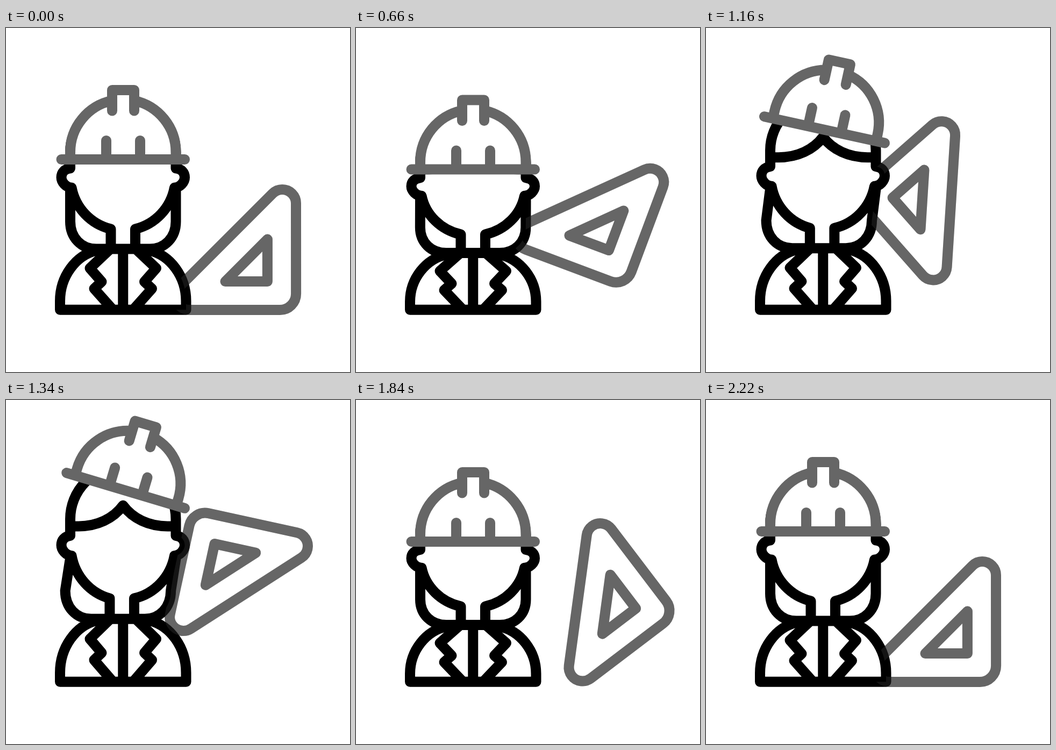
These frames come from a looping animation (640 by 640 pixels, 2.4 s). An HTML page with a canvas:

```html
<!DOCTYPE html>
<html lang="en">
<head>
<meta charset="utf-8">
<title>Engineer</title>
<style>
  html, body { margin: 0; width: 100%; height: 100%; overflow: hidden; background: #fff; }
  canvas { display: block; width: 640px; height: 640px; }
</style>
</head>
<body>
<canvas id="stage" width="640" height="640"></canvas>
<script>
const ctx = document.getElementById('stage').getContext('2d');
const LOOP = 2400, GREY = '#666', BASE = 524.3, AXIS = 217.75;

// Smooth curve through [time, value] keys, flat at every turning point.
function curve(...keys) {
  const rise = i => (keys[i + 1][1] - keys[i][1]) / (keys[i + 1][0] - keys[i][0]);
  const slopes = keys.map((_, i) => {
    if (i === 0 || i === keys.length - 1) return 0;
    const a = rise(i - 1), b = rise(i);
    return a * b > 0 ? 2 * a * b / (a + b) : 0;
  });
  return t => {
    if (t <= keys[0][0]) return keys[0][1];
    const i = keys.findIndex(k => k[0] >= t) - 1;
    if (i < 0) return keys[keys.length - 1][1];
    const [t0, v0] = keys[i], [t1, v1] = keys[i + 1];
    const d = t1 - t0, u = (t - t0) / d, w = 1 - u;
    return v0 * w * w * (1 + 2 * u) + v1 * u * u * (3 - 2 * u)
      + d * u * w * (slopes[i] * w - slopes[i + 1] * u);
  };
}

// Crouch, jump, land and rise again.
const stretch = curve([200, 0], [600, -.069], [1400, .034], [1800, -.069], [2200, 0]);
const sway = curve([600, 0], [1400, -9.5], [1600, 0]);
const hatY = curve([200, 0], [600, 19.5], [1400, -44], [1540, -44], [1800, 19.5], [2200, 0]);
const hatTilt = curve([700, 0], [1400, 17], [1500, 17], [1800, 0]);
const rulerX = curve([300, 0], [680, 10], [1800, 9], [2200, 0]);
const rulerY = curve([300, 0], [660, -75.5], [980, -99], [1340, -66.5], [1840, -34], [2200, 0]);
const rulerTurn = curve([400, 0], [2200, 360]);

// Set square around its own pivot: rounded outer triangle and inner cut-out.
const ruler = new Path2D();
ruler.arc(89, -82.6, 25.5, -Math.PI * .75, 0);
ruler.arc(84.6, 86, 30, 0, Math.PI / 2);
ruler.arc(-84, 90.4, 25.5, Math.PI / 2, Math.PI * 1.25);
ruler.closePath();
ruler.addPath(new Path2D('M61.4 -15.5V63H-17Z'));

const hatFill = new Path2D('M119.5 244.5V231A98 98 0 0 1 316 231V244.5ZM197.5 140V115.5H238.5V140Z');
const hatLines = new Path2D('M103 244.5H332.5M119.5 244V231A98 98 0 0 1 197.5 135'
  + 'M316 244V231A98 98 0 0 0 238.5 135M197.5 154V115.5H238.5V154M186.5 209.5V244M249.5 209.5V244');

// Left half of the figure; h shifts the loose hair sideways.
function half(h) {
  const dome = `M${AXIS} 136A98 95 0 0 0 119.5 231V261`;
  const ear = 'C109 262 103 269 103 278S112 297 122 297';
  const hair = `L${119.5 + h} 360C${119.5 + h} 390 ${140 + h} 411 ${168 + h} 411`;
  const torso = `C130 423 100.5 462 100.5 508V${BASE}H${AXIS}`;
  return {
    outline: `${dome}${ear}L119.5 305${hair}L168 414${torso}Z`,
    lines: `${dome}${ear}A98 98 0 0 0 ${195 + h * .22} 374V411`
      + `M119.5 302${hair}H${AXIS}V${BASE}M168 414${torso}`
      + `M192 413L156 447L178 472L164 485L199 ${BASE}`
      + `M119.5 244H135C170 244 200 230 ${AXIS} 206.5`
  };
}

// Both halves joined, stretched upward from the base line.
function figure(t) {
  const s = 1 + stretch(t), h = sway(t), drop = BASE * (1 - s);
  const outline = new Path2D(), lines = new Path2D();
  for (const side of [1, -1]) {
    const part = half(h * side);
    const m = new DOMMatrix([side, 0, 0, s, side > 0 ? 0 : 2 * AXIS, drop]);
    outline.addPath(new Path2D(part.outline), m);
    lines.addPath(new Path2D(part.lines), m);
  }
  return { outline, lines };
}

function paint(path, fill, line) {
  if (fill) { ctx.fillStyle = fill; ctx.fill(path); }
  if (line) { ctx.strokeStyle = line; ctx.stroke(path); }
}

// Runs the drawing steps in a frame placed at x, y and turned by degrees.
function place(x, y, degrees, steps) {
  ctx.save();
  ctx.translate(x, y);
  ctx.rotate(degrees * Math.PI / 180);
  steps();
  ctx.restore();
}

function drawRuler(t) {
  place(425 + rulerX(t), 408.6 + rulerY(t), rulerTurn(t), () => paint(ruler, null, GREY));
}

function drawHat(t) {
  place(333, 244.5 + hatY(t), hatTilt(t), () => {
    ctx.translate(-333, -244.5);
    paint(hatFill, '#fff');
    paint(hatLines, null, GREY);
  });
}

function draw() {
  const t = performance.now() % LOOP;
  const { outline, lines } = figure(t);
  ctx.fillStyle = '#fff';
  ctx.fillRect(0, 0, 640, 640);
  ctx.lineWidth = 19;
  ctx.lineCap = ctx.lineJoin = 'round';

  drawRuler(t);
  paint(outline, '#fff');
  paint(lines, null, '#000');

  // The ruler shows faintly over the outer edge of the figure.
  const outside = new Path2D(outline);
  outside.rect(0, 0, 640, 640);
  ctx.save();
  ctx.clip(outside, 'evenodd');
  ctx.globalAlpha = .2;
  drawRuler(t);
  ctx.restore();

  drawHat(t);
  requestAnimationFrame(draw);
}
draw();
</script>
</body>
</html>
```
